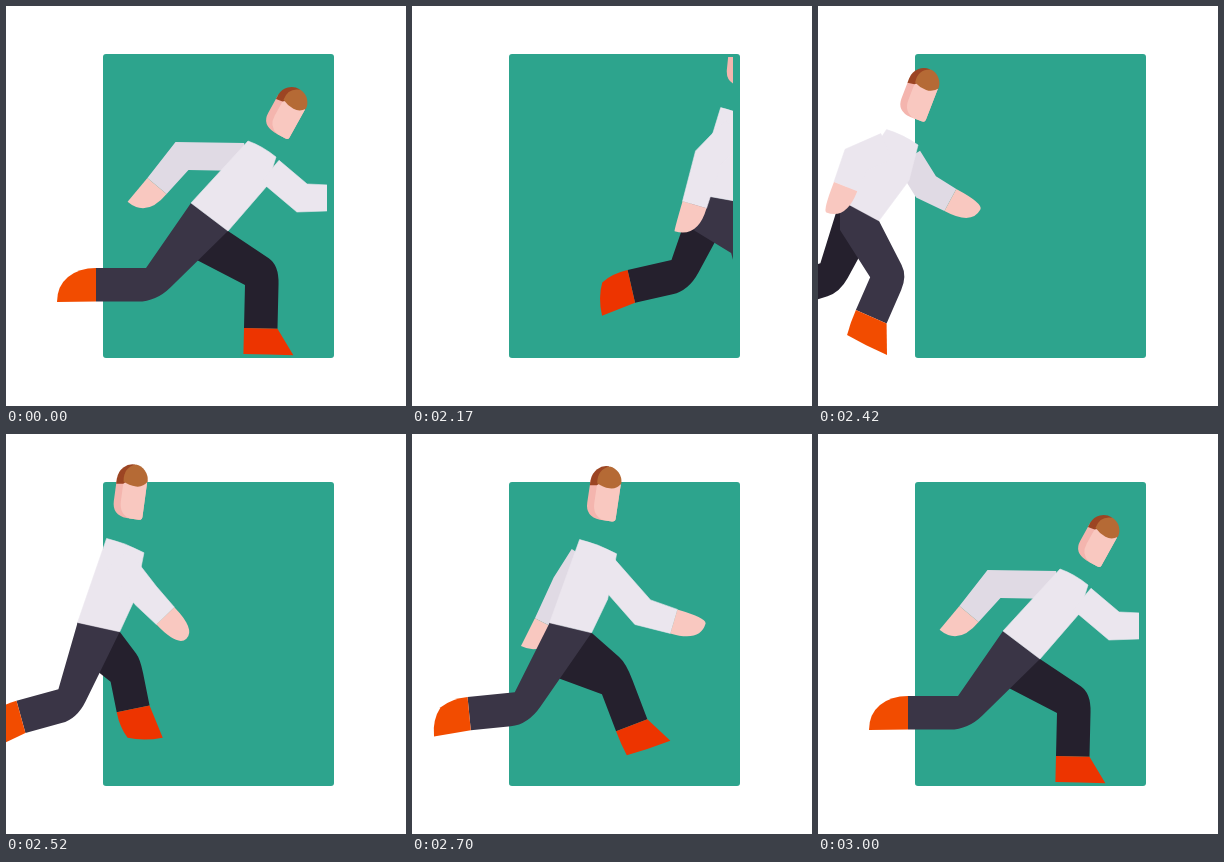
Animation, 400 px wide and 400 px high, one loop 3020 ms. Source, as an HTML page:

```html
<!DOCTYPE html>
<html lang="en">
<head>
<meta charset="utf-8">
<title>Runner</title>
<style>
  html, body { margin: 0; width: 100%; height: 100%; overflow: hidden; background: #fff; }
  svg { display: block; width: 100vw; height: 100vh; }
</style>
</head>
<body>
<svg id="stage" viewBox="0 0 400 400">
  <defs>
    <clipPath id="doorway"><path d="M0 51H321V400H0Z"/></clipPath>
    <clipPath id="approach"><path d="M0 0H321V400H0Z"/></clipPath>
  </defs>
  <rect x="97" y="48" width="231" height="304" rx="3" fill="#2da48d"/>
</svg>
<script>
const LOOP = 3020, REST = 2000, STEPS = 40, STRIDE = 400, HOME = 185;

// Key poses; x is measured from the back of the waist.
const LOW = {
  back: [0, 197], front: [37, 225], armpit: [76, 180],
  shoulder: [85, 151], neck: [57, 135], head: [96, 106], tilt: [29]
};
const HIGH = {
  back: [0, 187], front: [43, 193], armpit: [54, 162],
  shoulder: [63, 113], neck: [24, 99], head: [46, 50], tilt: [4]
};
const LEG = [
  { at: 0, joint: [-45, 262], end: [-95, 262], round: [1] },
  { at: .25, joint: [37, 247], end: [46, 279], round: [.6] },
  { at: .45, joint: [58, 265], end: [74, 304], round: [0] },
  { at: .5, joint: [54, 279], end: [53, 322], round: [0] },
  { at: .75, joint: [-23, 254], end: [-67, 264], round: [.7] }
];
const ARM = [
  { at: 0, joint: [111, 192], end: [150, 192], side: [0] },
  { at: .27, joint: [11, 151], end: [-4, 199], side: [1] },
  { at: .5, joint: [-9, 150], end: [-34, 180], side: [1] },
  { at: .75, joint: [72, 162], end: [94, 182], side: [.5] }
];

const mix = (a, b, f) => a + (b - a) * f;
const blend = (p, q, f) => p.map((v, i) => mix(v, q[i], f));
const blendPose = (a, b, f) =>
  Object.fromEntries(Object.keys(a).filter(k => k !== 'at').map(k => [k, blend(a[k], b[k], f)]));
const smooth = f => f * f * (3 - 2 * f);
const move = (p, v, k) => [p[0] + v[0] * k, p[1] + v[1] * k];
const toward = (p, q) => {
  const d = Math.hypot(q[0] - p[0], q[1] - p[1]);
  return [(q[0] - p[0]) / d, (q[1] - p[1]) / d];
};
const forwardOf = u => [u[1], -u[0]];

const fmt = p => p[0].toFixed(2) + ' ' + p[1].toFixed(2);
const start = p => 'M' + fmt(p);
const line = (...pts) => pts.map(p => 'L' + fmt(p)).join('');
const quad = (c, p) => 'Q' + fmt(c) + ' ' + fmt(p);

function poseAt(keys, phase) {
  phase -= Math.floor(phase);
  const i = keys.findLastIndex(key => key.at <= phase);
  const a = keys[i], b = keys[i + 1] || keys[0];
  return blendPose(a, b, smooth((phase - a.at) / ((b.at || 1) - a.at)));
}

function legPaths(phase, body) {
  const { joint: knee, end: heel, round: [round] } = poseAt(LEG, phase);
  const down = toward(knee, heel), ahead = forwardOf(down);
  const reach = Math.max(0, knee[0]);
  const seat = [0, body.back[1] + reach];
  const instep = move(heel, ahead, 33.5);
  const cap = move(move(knee, ahead, 33.5), down, -10 - reach * .2);
  const leg = start(body.back) + line(seat, knee, heel, instep, blend(instep, cap, .7)) +
    quad(cap, blend(cap, body.front, .2)) + line(body.front) + 'Z';

  const at = (flat, curved) => {
    const [x, y] = blend(flat, curved, round);
    return move(move(heel, ahead, x), down, y);
  };
  const shoe = start(heel) + line(instep, at([50, 26], [34, 39])) +
    quad(at([25, 26], [18, 39]), at([0, 26], [9, 28])) +
    quad(at([0, 13], [0, 17]), heel) + 'Z';
  return [leg, shoe];
}

function armPaths(phase, body, shift) {
  const { joint, end, side: [side] } = poseAt(ARM, phase);
  const swing = Math.cos(phase * 2 * Math.PI);
  const shoulder = move(blend(body.neck, body.shoulder, .5), [13 * swing - 5, 15 + 7 * swing], 1);
  const elbow = move(joint, [shift, 0], 1), wrist = move(end, [shift, 0], 1);
  const upper = forwardOf(toward(shoulder, elbow));
  const along = toward(elbow, wrist), lower = forwardOf(along);
  const miter = 14 / (1 + upper[0] * lower[0] + upper[1] * lower[1]);
  const corner = [(upper[0] + lower[0]) * miter, (upper[1] + lower[1]) * miter];
  const front = move(wrist, lower, 12.5), back = move(wrist, lower, -12.5);
  const sleeve = start(move(shoulder, upper, 14)) +
    line(move(elbow, corner, 1), front, back, move(elbow, corner, -1), move(shoulder, upper, -14)) + 'Z';
  const hand = start(front) +
    quad(move(front, along, 31), move(blend(front, back, side), along, 31)) +
    quad(move(back, along, 31), back) + 'Z';
  return [sleeve, hand];
}

const stage = document.getElementById('stage');
function add(parent, tag, attrs = {}) {
  const el = document.createElementNS('http://www.w3.org/2000/svg', tag);
  for (const name in attrs) el.setAttribute(name, attrs[name]);
  return parent.appendChild(el);
}

const SKIN = '#f9c8c0', SHIRT = '#ebe6ee';
const COLORS = ['#e0dae4', SKIN, '#25202d', '#ed3400', '#3a3546', '#f24c00', SHIRT, SHIRT, SKIN];
const HEAD = [
  ['#f4b5ae', 'M-16-11H14.5V21Q14.5 24 11 24H-1Q-16 23-16 10Z'],
  [SKIN, 'M-9-11H14.5V21Q14.5 24 11 24H2Q-9 21-9 9Z'],
  ['#9c4523', 'M-16-6V-11A15.5 15.5 0 0 1 0-26L4-18L-9-7Z'],
  ['#b56a35', 'M-9-9Q-11-22 1-26A15 15 0 0 1 15-12Q11-6 4-6Q-3-6-9-9Z']
];

function makeRunner(clip) {
  const root = add(stage, 'g', { 'clip-path': `url(#${clip})` });
  const figure = add(root, 'g');
  // A hairline on the shirt closes the seam between torso and sleeve.
  const parts = COLORS.map(fill =>
    add(figure, 'path', { fill, stroke: fill === SHIRT ? SHIRT : 'none', 'stroke-width': .6 }));
  const head = add(figure, 'g');
  HEAD.forEach(([fill, d]) => add(head, 'path', { fill, d }));

  return (visible, x, phase) => {
    root.style.display = visible ? '' : 'none';
    if (!visible) return;
    const lift = Math.sin(Math.PI * (phase * 2 % 1) ** 1.35);
    const body = blendPose(LOW, HIGH, lift);
    const { back, front, armpit, shoulder, neck } = body;
    const bend = [mix(neck[0], shoulder[0], .5), mix(neck[1], shoulder[1], .3)];
    const torso = start(back) + line(front, armpit, shoulder) + quad(bend, neck) + 'Z';
    const shapes = [
      ...armPaths(phase + .5, body, 22 * lift * lift),
      ...legPaths(phase + .5, body),
      ...legPaths(phase, body),
      torso,
      ...armPaths(phase, body, 0)
    ];
    shapes.forEach((d, i) => parts[i].setAttribute('d', d));
    figure.setAttribute('transform', `translate(${x.toFixed(2)} 0)`);
    head.setAttribute('transform',
      `translate(${fmt(body.head)}) rotate(${body.tilt[0].toFixed(2)}) scale(1 ${1 + .1 * lift})`);
  };
}

const leaving = makeRunner('doorway');
const arriving = makeRunner('approach');

// Steps alternate between 20 and 30 ms.
function stepAt(time) {
  const t = time - REST;
  if (t < 0) return 0;
  return Math.min(STEPS, 2 * Math.floor(t / 50) + (t % 50 >= 20 ? 1 : 0));
}

// Steady run, then an eased slow-down.
const distance = k => k < 17 ? 13.9 * k : STRIDE - .4216 * (STEPS - k) ** 1.9;

function render(time) {
  const k = stepAt(time), run = distance(k), phase = run / STRIDE;
  leaving(k < 16, HOME + run, phase);
  arriving(k >= 8, HOME + run - STRIDE, phase);
}

const began = performance.now();
function tick() {
  render((performance.now() - began) % LOOP);
  requestAnimationFrame(tick);
}
tick();
</script>
</body>
</html>
```
